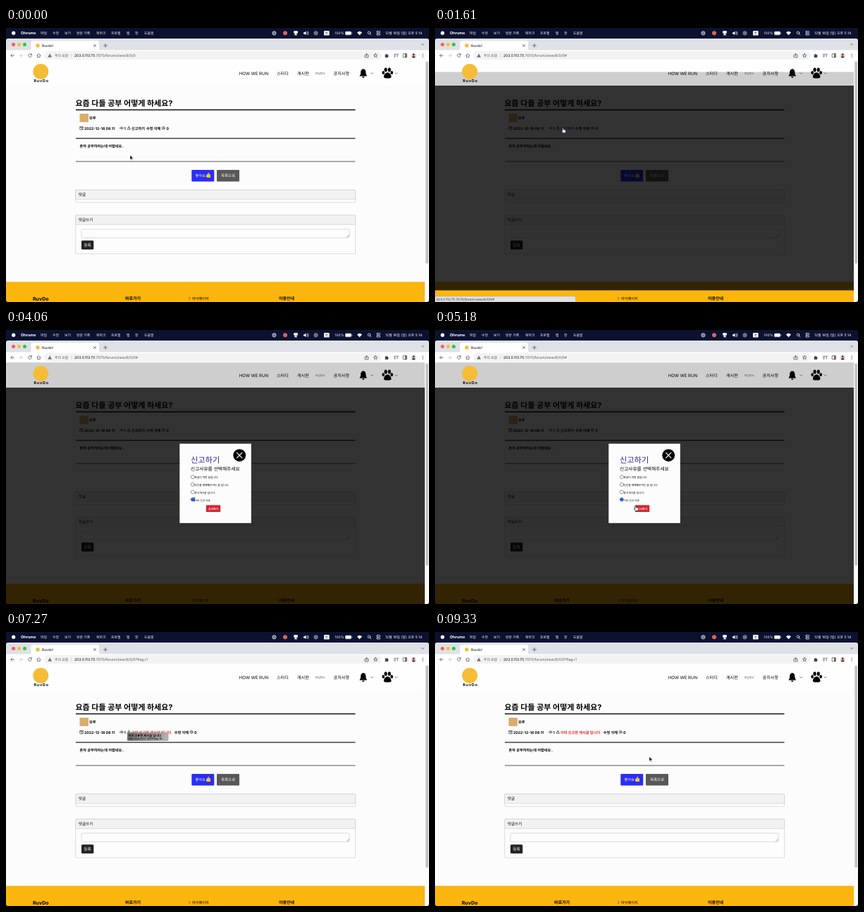
These frames come from a looping animation (600 by 390 pixels, 9.36 s). An HTML page:

```html
<!DOCTYPE html>
<html lang="ko">
<head>
<meta charset="utf-8">
<style>
html, body { margin: 0; width: 100%; height: 100%; overflow: hidden; background: #000; }
svg { display: block; width: 100vw; height: 100vh; }
text { font: 5.2px Inter, 'Noto Sans CJK KR', sans-serif; text-rendering: geometricPrecision; white-space: pre; }
.b text, text.b { font-weight: 700; }
.w text, text.w { fill: #fff; }
.line { fill: none; stroke: #444; stroke-width: .7; stroke-linecap: round; stroke-linejoin: round; }
.bar text { font-size: 4.9px; }
.nav text { font-size: 6.1px; }
.card { fill: #fdfdfd; stroke: #cfcfcf; stroke-width: .7; }
.head { fill: #f2f2f2; stroke: #cfcfcf; stroke-width: .7; }
.opts text { font-size: 3.75px; font-weight: 500; }
.opts circle { fill: #fff; stroke: #555; stroke-width: .6; }
</style>
</head>
<body>
<svg viewBox="0 0 600 390">
  <rect y="46" width="600" height="344" fill="#fcfcfc"/>

  <!-- post -->
  <text class="b" x="98.5" y="111" style="font-size:11px">요즘 다들 공부 어떻게 하세요?</text>
  <path d="M99 116.5H495.5" stroke="#111" stroke-width="1.5"/>
  <rect x="104.5" y="122" width="12.5" height="12" fill="#d9ae6c"/>
  <g class="b">
    <text x="118" y="130">모루</text>
    <text x="111" y="144.8">2022-12-18 08:11</text>
    <text x="167.5" y="144.8">1</text>
    <text x="104.5" y="169.6">혼자 공부하려는데 어렵네요..</text>
    <g id="before">
      <text id="report" x="178" y="144.8">신고하기</text>
      <text x="199" y="144.8">수정 삭제</text>
      <text x="227.5" y="144.8">0</text>
    </g>
    <g id="after">
      <text x="178" y="144.8" fill="#f01818">이미 신고한 게시글 입니다.</text>
      <text x="238.7" y="144.8">수정 삭제</text>
      <text x="267" y="144.8">0</text>
    </g>
  </g>
  <g class="line">
    <path d="M105.2 140.3H109.2V144.8H105.2ZM105.2 141.4H109.2M107.2 142V143.5H108.3"/>
    <path d="M161.4 142.4Q164 139.2 166.6 142.4Q164 145.6 161.4 142.4Z"/><circle cx="164" cy="142.4" r=".7"/>
    <path d="M174.5 140.2L176.6 144.4H172.4ZM174.5 141.7V143"/>
    <g id="count"><circle cx="223.3" cy="142.4" r="2.1"/><circle cx="223.3" cy="142.4" r=".6" fill="#444"/></g>
  </g>
  <path d="M99 157.2H495.5" stroke="#222" stroke-width="1.3"/>
  <path d="M99 190H495.5" stroke="#555"/>

  <g class="w">
    <rect x="263.3" y="202" width="32" height="16.5" rx="1" fill="#2a2ef6"/>
    <text x="268.5" y="212.2">좋아요</text>
    <path d="M284 209.5L286 207.8 287 205.8 288 206.3 287.6 208.2H290V213H286L284 212.4Z" fill="#fbc23c"/>
    <rect x="299" y="202" width="32" height="16.5" rx="1" fill="#585858"/>
    <text x="305" y="212.2" style="font-size:5.5px">목록으로</text>
  </g>

  <rect class="card" x="98.8" y="230.5" width="396.8" height="17.8" rx="1"/>
  <rect class="head" x="98.8" y="230.5" width="396.8" height="13.5" rx="1"/>
  <text x="102.8" y="239.3" style="font-size:5.6px">댓글</text>
  <rect class="card" x="98.8" y="266.3" width="396.8" height="55" rx="1"/>
  <rect class="head" x="98.8" y="266.3" width="396.8" height="13.4" rx="1"/>
  <text x="102.8" y="275.1" style="font-size:5.6px">댓글쓰기</text>
  <rect class="card" x="107" y="286.3" width="380.3" height="12.4" rx="2"/>
  <path class="line" style="stroke-width:.4" d="M483.5 297.5L486.3 294.7M485.2 297.5L486.3 296.4"/>
  <rect x="107" y="302.6" width="17.3" height="12.7" rx="1.5" fill="#212326"/>
  <text class="w" x="110.4" y="311" style="font-size:5.6px">등록</text>

  <!-- footer -->
  <rect y="361.3" width="594" height="29" fill="#fbb50f"/>
  <text class="b" x="38" y="387.6" style="font-size:7px">RuvDo</text>
  <text class="b" x="169" y="387" style="font-size:6px">바로가기</text>
  <path class="line" d="M259.5 383L261.2 384.8 259.5 386.6"/>
  <text x="264" y="386.8">마이페이지</text>
  <text class="b" x="387" y="387" style="font-size:6px">이용안내</text>

  <rect id="shade" x="-297" y="-172" width="594" height="344" fill-opacity=".8"/>

  <!-- site header -->
  <rect y="46" width="594" height="36" fill="#fff" fill-opacity=".76"/>
  <circle cx="49.3" cy="62" r="11" fill="#f5bd36"/>
  <text class="b" x="39.4" y="77" style="font-size:5.4px;letter-spacing:.8px">RuvDo</text>
  <g class="nav">
    <text x="330.8" y="66.6">HOW WE RUN</text>
    <text x="384" y="66.6">스터디</text>
    <text x="413" y="66.6">게시판</text>
    <text x="438.8" y="65.6" fill="#444" style="font-size:3.8px">모임장소</text>
    <text x="464.6" y="66.6">공지사항</text>
  </g>
  <path d="M506.8 58.2C503.8 58.6 503.2 61 503.1 64.2C503 66.3 502 67.4 501.4 68.5H512.2C511.6 67.4 510.6 66.3 510.5 64.2C510.4 61 509.8 58.6 506.8 58.2ZM505 69.3H508.6Q508.2 71 506.8 71T505 69.3Z"/>
  <path class="line" d="M517.6 63.8L519.2 65.4 520.8 63.8M551.9 63.8L553.5 65.4 555.1 63.8"/>
  <g>
    <ellipse cx="538.6" cy="59.5" rx="2.1" ry="3"/><ellipse cx="543.8" cy="59.5" rx="2.1" ry="3"/>
    <ellipse cx="535.2" cy="63.6" rx="1.8" ry="2.5"/><ellipse cx="547.2" cy="63.6" rx="1.8" ry="2.5"/>
    <path d="M541.2 63.3C544 63.3 546.8 67.2 546.5 69.6C546.2 72.3 543.2 71.4 541.2 71.4S536.2 72.3 535.9 69.6C535.6 67.2 538.4 63.3 541.2 63.3Z"/>
  </g>

  <!-- report dialog, centred on its own origin -->
  <g id="modal"><g transform="translate(-297 -218.4)">
    <rect x="246.3" y="161.8" width="101.5" height="113" fill="#fcfcfc"/>
    <text x="262" y="188.6" fill="#20249a" style="font-size:11.2px">신고하기</text>
    <circle cx="331.2" cy="178.3" r="8.9"/>
    <path d="M327.2 174.3L335.2 182.3M335.2 174.3L327.2 182.3" stroke="#fff" stroke-width="1.2"/>
    <text x="262" y="199.6" style="font-size:6.7px">신고사유를 선택해주세요</text>
    <g class="opts">
      <circle cx="264.8" cy="209.2" r="2.5"/><text x="267.3" y="211.4">욕설이 적힌 글입니다.</text>
      <circle cx="264.8" cy="219.9" r="2.5"/><text x="267.3" y="222">타인을 명예훼손하는 글 입니다.</text>
      <circle cx="264.8" cy="230.6" r="2.5"/><text x="267.3" y="232.8">광고게시글 입니다.</text>
      <circle cx="264.8" cy="241.3" r="2.5"/><text x="267.3" y="243.5">기타 신고 사유</text>
      <circle id="picked" cx="264.8" cy="241.3" r="2" style="fill:#1b62e8;stroke:#1b62e8;stroke-width:1"/>
    </g>
    <rect x="283.8" y="249.3" width="20.4" height="9.8" rx="1.2" fill="#d9242f"/>
    <text class="b w" x="287" y="255.6" style="font-size:3.8px">신고하기</text>
  </g></g>

  <rect x="594" y="46" width="6" height="344" fill="#fafafa"/>
  <rect x="595.4" y="47.5" width="3.6" height="288" rx="1.8" fill="#c1c1c1"/>

  <!-- menu bar -->
  <g class="bar w">
    <rect width="600" height="20" fill="#0b1230"/>
    <circle cx="10.7" cy="7.2" r="2.6" fill="#fff"/>
    <text class="b" x="21" y="9.2" style="font-size:5.5px">Ohrume</text>
    <g id="menu"></g>
    <text x="466.5" y="9.2">100%</text>
    <text x="538" y="9.2" style="font-size:5px">12월 18일 (일) 오후 5:14</text>
    <circle cx="380.4" cy="7.3" r="2.5" fill="none" stroke="#fff"/><circle cx="380.4" cy="7.3" r="1" fill="#fff"/>
    <circle cx="396" cy="7.3" r="3" fill="#d9645a"/>
    <path d="M408.5 4.5H413.5V7.5H408.5ZM409 10.2L411 7.5 413 10.2" fill="#fff" stroke="#fff" stroke-width=".6"/>
    <path d="M422 6.2H423.5L425.5 4.5V10.1L423.5 8.4H422Z" fill="#fff"/>
    <path class="line" style="stroke:#fff" d="M427 5.8Q428 7.3 427 8.8M428.3 4.8Q430 7.3 428.3 9.8M500 6Q501.5 4.6 503 6"/>
    <circle cx="439.5" cy="7.3" r="2.5" fill="none" stroke="#fff" stroke-width=".7"/><path d="M438.8 6L441 7.3 438.8 8.6Z" fill="#fff"/>
    <rect x="451" y="4" width="7.6" height="6.6" rx="1.2" fill="#fff"/><text x="452.8" y="9" style="fill:#111;font-size:4.4px">한</text>
    <rect x="481.3" y="5" width="8.4" height="4.8" rx="1.2" fill="#fff" stroke="#aaa" stroke-width=".6"/><path d="M490.8 6.6V8.2" stroke="#aaa"/>
    <path d="M501.5 10.2L498 6.5Q501.5 3.2 505 6.5Z" fill="#fff"/>
    <g class="line" style="stroke:#fff"><circle cx="515" cy="6.8" r="1.8"/><path d="M516.4 8.2L517.8 9.8"/><rect x="525.8" y="4.6" width="5" height="2.1" rx="1"/><rect x="525.8" y="8" width="5" height="2.1" rx="1"/></g>
  </g>

  <!-- browser frame -->
  <path d="M0 32V18Q0 15 3 15H597Q600 15 600 18V32Z" fill="#dee1e6"/>
  <circle cx="10.6" cy="23.5" r="2.5" fill="#fc5b57"/><circle cx="18.6" cy="23.5" r="2.5" fill="#fdbc2e"/><circle cx="26.5" cy="23.5" r="2.5" fill="#28c840"/>
  <path d="M33 32Q35.5 32 35.5 29.5V20.5Q35.5 18 38 18H129.5Q132 18 132 20.5V29.5Q132 32 134.5 32Z" fill="#fff"/>
  <circle cx="45" cy="25" r="2.7" fill="#f5bd36"/>
  <text x="51" y="26.8" style="font-size:4.9px">Ruvdo!</text>
  <rect y="31.5" width="600" height="14.7" fill="#fff"/>
  <rect x="54" y="33" width="479" height="12" rx="6" fill="#f1f3f4"/>
  <g class="line">
    <path d="M124.5 23.5L127.5 26.5M127.5 23.5L124.5 26.5M138.5 25H143.5M141 22.5V27.5M589.5 22.5L591.2 24.2 592.9 22.5"/>
    <path d="M11.5 39.2H6.8L8.9 37M6.8 39.2L8.9 41.4"/>
    <path d="M18.5 39.2H23.2L21.1 37M23.2 39.2L21.1 41.4" style="stroke:#bbb"/>
    <path d="M36 37.6A2.4 2.4 0 1 0 36.3 40M36.3 36.5V38.3H34.6M43.8 39L46.4 36.7 49 39M44.6 38.6V41.6H48.2V38.6"/>
    <path d="M510 38.3H509V41.8H514V38.3H513M511.5 40V36.4L510.3 37.6M511.5 36.4L512.7 37.6"/>
    <path d="M524.2 36.4L525 38.2 526.9 38.4 525.5 39.7 525.9 41.6 524.2 40.6 522.5 41.6 522.9 39.7 521.5 38.4 523.4 38.2Z"/>
    <path d="M550.5 37.3H554M550.5 39.2H553M550.5 41H552.3M555.3 41V37.2H556.6"/>
    <rect x="563.6" y="36.7" width="5" height="5"/><path d="M567 37V41.5" stroke-width="1.6"/>
  </g>
  <path d="M62.2 36.6L64.9 41.4H59.5Z" fill="#555"/><path d="M62.2 38.2V39.8M62.2 40.3V40.9" stroke="#fff" stroke-width=".5"/>
  <path d="M537.6 37.8H539Q539.6 35.6 540.4 37.8H542V39.2Q543.9 39.8 542 40.6V42H537.6V40.5Q539 39.8 537.6 39.2Z" fill="#444"/>
  <circle cx="578.2" cy="39.2" r="3.5" fill="#e3d3c8"/><circle cx="578.2" cy="38" r="1.4" fill="#5a3a30"/><path d="M575.6 41.5Q578.2 38.6 580.8 41.5Q578.2 43.8 575.6 41.5Z" fill="#5a3a30"/>
  <g fill="#444"><circle cx="591.2" cy="37.2" r=".6"/><circle cx="591.2" cy="39.2" r=".6"/><circle cx="591.2" cy="41.2" r=".6"/></g>
  <text x="69" y="41.2" fill="#555" style="font-size:4.9px">주의 요함</text>
  <path d="M93 36.8V41.8" stroke="#bbb" stroke-width=".5"/>
  <text x="97" y="41.2" style="font-size:5.1px">203.0.113.75<tspan fill="#555" id="path"></tspan></text>
  <path d="M0 387V390H3Q0 390 0 387ZM600 387V390H597Q600 390 600 387Z"/>

  <g id="status">
    <path d="M0 382H197.5Q199.5 382 199.5 384V390H0Z" fill="#e0e2e6" stroke="#aaa" stroke-width=".5"/>
    <text id="note" x="1.5" y="387.8" fill="#333" style="font-size:4.7px"></text>
  </g>

  <g id="drag">
    <linearGradient id="fade"><stop stop-color="#666"/><stop offset="1" stop-color="#aaa"/></linearGradient>
    <rect x="-14.5" y="-1" width="58.5" height="12" rx="1" fill="url(#fade)" fill-opacity=".9"/>
    <text class="b" x="-13" y="4.6" style="font-size:4.3px">이미 신고한 게시글 입니다.</text>
    <text x="-13" y="9.4" style="font-size:3.8px">http://203.0.1…0/0?flag=1#</text>
  </g>

  <g id="cursor" stroke="#fff" stroke-width=".5" stroke-linejoin="round">
    <path id="arrow" d="M0 0V6.4L1.5 5 2.5 7.2 3.5 6.8 2.5 4.7 4.5 4.6Z"/>
    <path id="hand" d="M-.5 .6Q.2 -.4 .9 .6L1.3 2.6 3.7 3Q4.8 3.2 4.6 4.6L4 7.4H.6L-1.6 4.8Q-1.7 3.7 -.2 4.5Z" fill="#fff" stroke="#111" stroke-width=".7"/>
    <path id="beam" d="M-1 -2.6Q0 -2.6 0 -2Q0 -2.6 1 -2.6M0 -2V2M-1 2.6Q0 2.6 0 2Q0 2.6 1 2.6" fill="none" stroke="#111" stroke-width=".7"/>
  </g>
</svg>
<script>
const LOOP = 9360, OPEN = 890, PICK = 3850, RELOAD = 5560;
const $ = id => document.getElementById(id);
const clamp = v => Math.min(1, Math.max(0, v));
const easeOut = v => 1 - (1 - clamp(v)) ** 4;
const show = (id, on) => { $(id).style.display = on ? '' : 'none'; };
const within = (t, a, b) => t >= a && t < b;

// time, x, y of the pointer tip
const route = [
  [0, 176, 181], [200, 176, 181], [600, 181, 142], [1700, 181, 142],
  [2350, 268, 204], [2800, 262.5, 230], [3300, 262.5, 230], [3700, 267.3, 241],
  [4300, 267.3, 241], [4900, 284, 250], [5900, 284, 250], [6600, 190, 141],
  [6950, 186, 142], [7270, 186.5, 144], [7500, 188, 146], [8500, 304, 177.5], [LOOP, 304, 177.5]
];

const menu = { 49: '파일', 66: '수정', 83: '보기', 100: '방문 기록', 128: '북마크', 149: '프로필', 171: '탭', 183: '창', 196: '도움말' };
$('menu').innerHTML = Object.entries(menu).map(([x, s]) => `<text x="${x}" y="9.2">${s}</text>`).join('');

function pointer(t) {
  const i = route.findIndex(k => k[0] > t);
  const [a, x, y] = route[i - 1], [b, u, v] = route[i];
  const p = (t - a) / (b - a), s = p * p * (3 - 2 * p);
  return [x + (u - x) * s, y + (v - y) * s];
}

// opacity of a note visible from a to b, fading out over 250 ms
const noteAlpha = (t, a, b) => t < a ? 0 : Math.min(clamp((t - a) / 80), 1 - clamp((t - b) / 250));

function draw(t) {
  const done = t >= RELOAD, open = t >= OPEN && !done, age = t - OPEN;
  const base = ':7070/forum/view/6/0/0';
  show('before', !done);
  show('after', done);
  $('count').setAttribute('transform', `translate(${done ? 39.8 : 0} 0)`);
  $('path').textContent = base + (done ? '?flag=1' : open ? '#' : '');
  $('report').setAttribute('fill', within(t, 580, 1750) ? '#2038d0' : '#000');

  // the shade unfolds as a thin line, then opens vertically; the dialog zooms in
  show('shade', open);
  show('modal', open && age > 800);
  const sy = .005 + .995 * easeOut((age - 500) / 500);
  $('shade').setAttribute('transform', `translate(297 218) scale(${easeOut(age / 500)} ${sy})`);
  $('modal').setAttribute('transform', `translate(297 218.4) scale(${easeOut((age - 800) / 500)})`);
  show('picked', t >= PICK);

  const link = Math.max(noteAlpha(t, 620, 1720), noteAlpha(t, 6680, 6950));
  const wait = noteAlpha(t, 5250, 5600);
  $('status').setAttribute('opacity', Math.max(link, wait));
  $('note').textContent = wait ? '연결 중…' : '203.0.113.75' + base + (done ? '?flag=1#' : '#');

  const [x, y] = pointer(t), at = `translate(${x} ${y})`;
  const hand = within(t, 560, 1750) || within(t, 4800, 5950) || within(t, 6550, 7000);
  const beam = within(t, 3650, 4450);
  $('cursor').setAttribute('transform', at);
  show('hand', hand);
  show('beam', beam);
  show('arrow', !hand && !beam);
  $('drag').setAttribute('transform', at);
  show('drag', within(t, 7000, 7550));
}

function tick() {
  draw(performance.now() % LOOP);
  requestAnimationFrame(tick);
}
tick();
</script>
</body>
</html>
```
